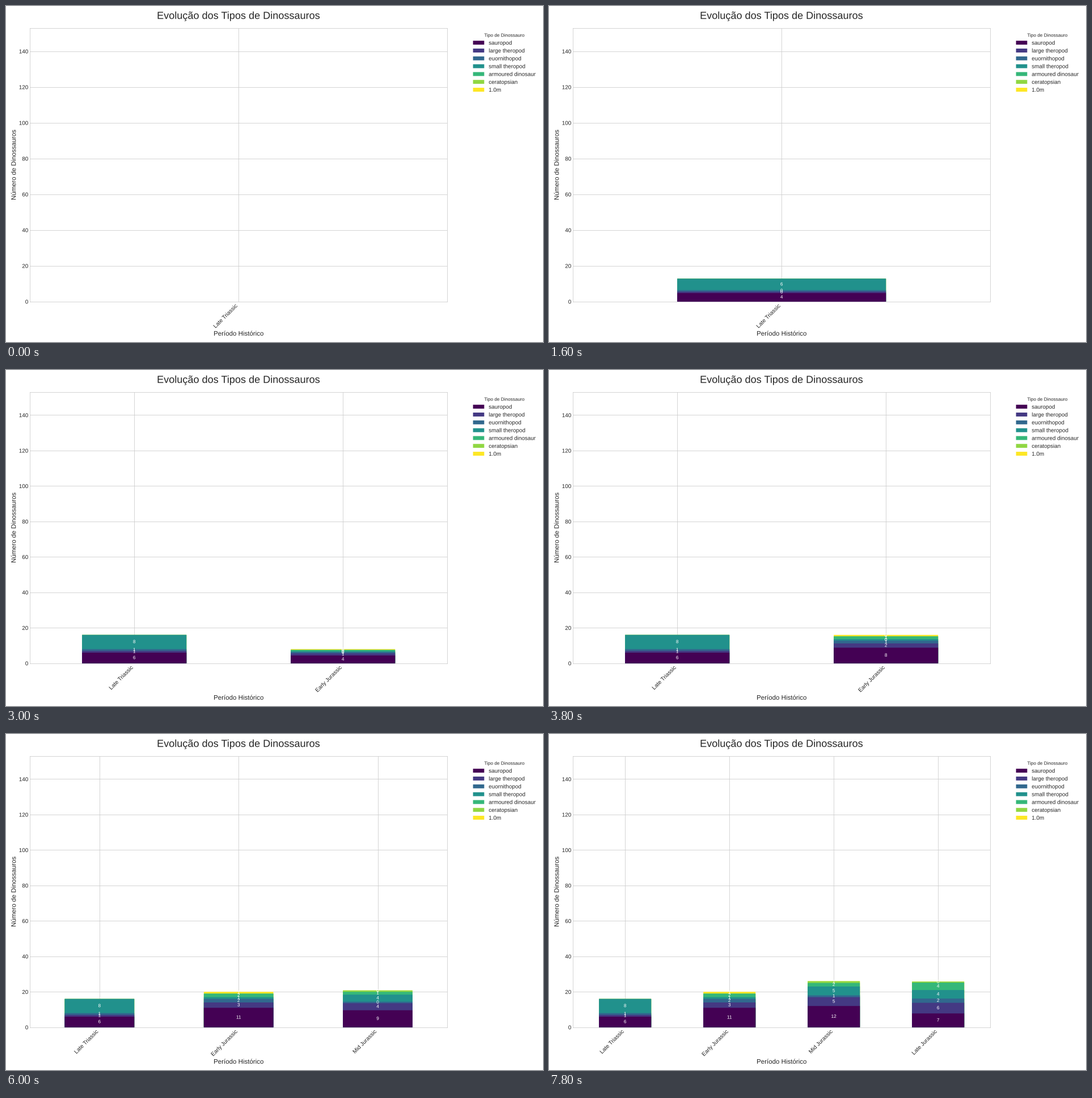
These frames come from a looping animation (947x592 px, 8000 ms). A matplotlib script:

```python
import numpy as np
import matplotlib.pyplot as plt
from matplotlib.animation import FuncAnimation
from matplotlib.patches import Rectangle
from matplotlib.patheffects import Normal

W, H, DPI = 947, 592, 59.2
STEPS = 10  # growth steps per period, plus one resting frame

plt.rcParams.update({
    "font.family": "Liberation Sans",
    "text.hinting": "none",
    "text.color": ".15",
    "axes.labelcolor": ".15",
    "xtick.color": ".15",
    "ytick.color": ".15",
    "axes.edgecolor": ".8",
    "axes.linewidth": 1,
    "axes.axisbelow": True,
    "axes.grid": True,
    "grid.color": ".8",
    "grid.linewidth": 1,
    "xtick.major.size": 0,
    "ytick.major.size": 0,
    "path.effects": [Normal()],  # outlines keep sub-pixel glyph positions
})

KINDS = ["sauropod", "large theropod", "euornithopod", "small theropod",
         "armoured dinosaur", "ceratopsian", "1.0m"]
COLORS = plt.get_cmap("viridis")(np.linspace(0, 1, len(KINDS)))
PERIODS = ["Late Triassic", "Early Jurassic", "Mid Jurassic", "Late Jurassic"]
COUNTS = np.array([
    [6, 1, 1, 8, 0, 0, 0],
    [11, 3, 2, 1, 2, 0, 1],
    [12, 5, 1, 5, 2, 1, 0],
    [13, 10, 4, 8, 7, 1, 0],
])
Y_MAX = 139 * 1.1

LEFT, RIGHT, TOP = 42.2, 778.2, 39.2

fig = plt.figure(figsize=(W / DPI, H / DPI), dpi=DPI, facecolor="white")
ax = fig.add_axes([0, 0, 1, 1])


def draw_legend():
    x, y, row = 823.6, 68.1, 13.81
    fig.text(879 / W, 1 - 54.2 / H, "Tipo de Dinossauro", size=10, ha="center")
    for i, (kind, color) in enumerate(zip(KINDS, COLORS)):
        base = 1 - (y + i * row) / H
        fig.add_artist(Rectangle((x / W, base), 19.73 / W, 6.9 / H,
                                 transform=fig.transFigure, facecolor=color,
                                 linewidth=0, snap=False))
        fig.text((x + 27.63) / W, base, kind, size=12)


def draw_stack(x, values):
    tops = np.cumsum(values)
    # Tallest first, each from zero, so no seams show between segments
    for top, color in zip(tops[::-1], COLORS[::-1]):
        if top > 0:
            ax.bar(x, top, width=0.5, color=color, linewidth=0, snap=False)
    for value, top in zip(values, tops):
        if value > 0:
            ax.text(x, top - value / 2, str(int(value + 1e-9)), size=10,
                    color="white", ha="center", va="center")


def draw(frame):
    last, step = divmod(frame, STEPS + 1)
    n = last + 1
    bottom = 520.8 if n == 1 else 516.7

    ax.clear()
    ax.set_position([LEFT / W, 1 - bottom / H,
                     (RIGHT - LEFT) / W, (bottom - TOP) / H])
    for i in range(n):
        draw_stack(i, COUNTS[i] * (step / STEPS if i == last else 1.0))

    ax.set_xlim(-0.5, n - 0.5)
    ax.set_ylim(0, Y_MAX)
    ax.set_xticks(range(n), PERIODS[:n], rotation=45, ha="right")
    ax.set_yticks(range(0, 141, 20))
    ax.tick_params(labelsize=12)
    ax.set_title("Evolução dos Tipos de Dinossauros", size=22, pad=20)
    ax.set_xlabel("Período Histórico", size=14)
    ax.set_ylabel("Número de Dinossauros", size=14)
    return []


draw_legend()
anim = FuncAnimation(fig, draw, frames=40, interval=200, init_func=lambda: [],
                     repeat=True, repeat_delay=0, blit=False)
plt.show()
```
